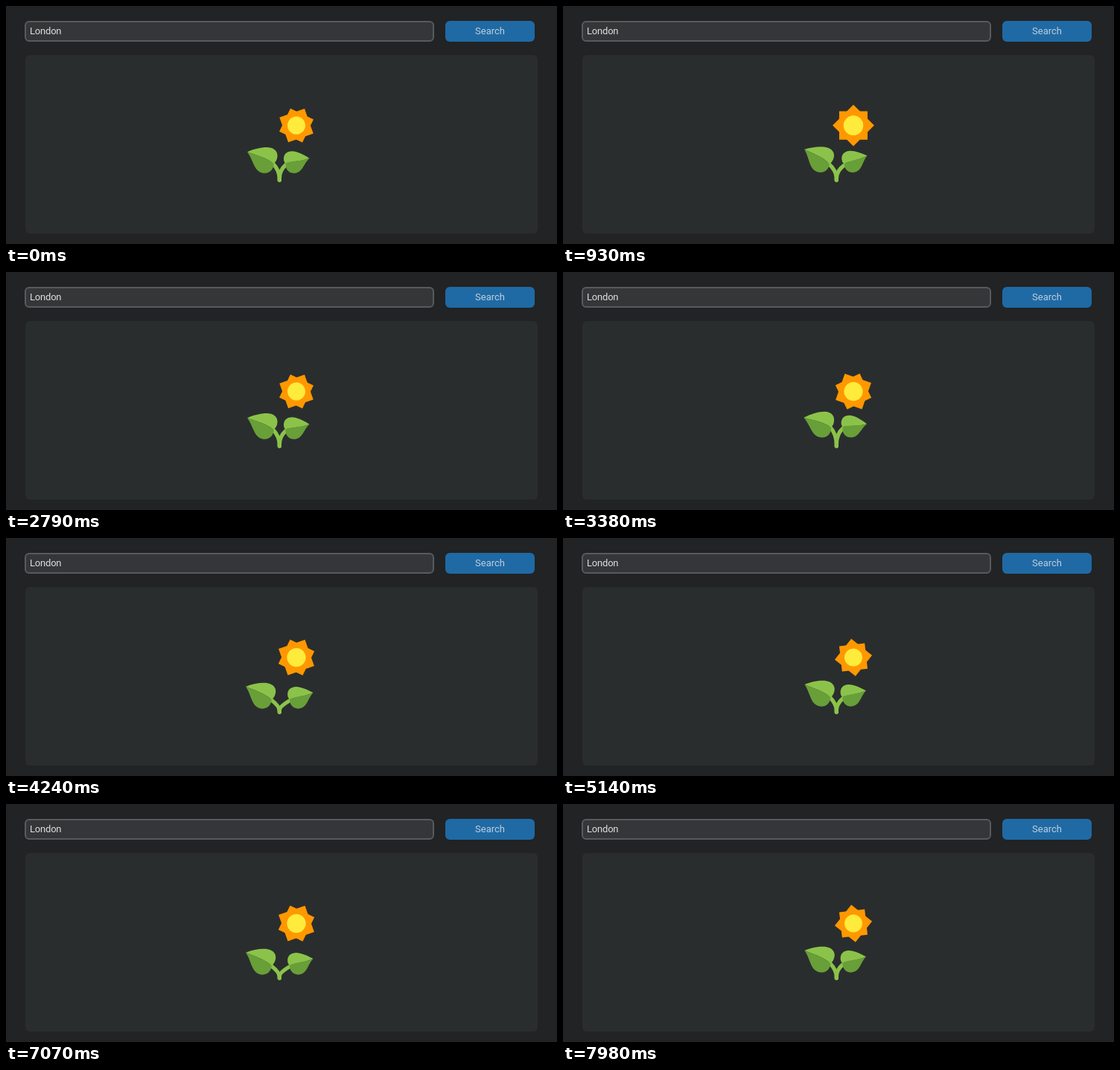
An HTML page that plays this animation: 740 px wide and 320 px high, repeating every 8000 ms.

```html
<!DOCTYPE html>
<html lang="en">
<head>
<meta charset="utf-8">
<title>City search</title>
<style>
  html, body { margin: 0; width: 100%; height: 100%; overflow: hidden; background: #212325; }
  svg { display: block; width: 740px; height: 320px; }
  text { font: 13px Roboto, sans-serif; }
  .entry { fill: #dedede; letter-spacing: -.2px; }
  .light { fill: #8bc34a; }
  .dark { fill: #689f38; }
  .stem { fill: none; stroke: #8bc34a; stroke-width: 5.3; stroke-linecap: round; }
</style>
</head>
<body>
<svg viewBox="0 0 740 320">
  <rect x="26" y="21" width="548" height="26" rx="5" fill="#343638" stroke="#565b5e" stroke-width="2"/>
  <text class="entry" x="32" y="38">London</text>
  <rect x="590" y="20" width="120" height="28" rx="6" fill="#1f6aa5"/>
  <text x="650" y="38" text-anchor="middle" fill="#c0cedb">Search</text>
  <rect x="26" y="66" width="688" height="240" rx="6" fill="#2a2d2e"/>

  <g id="sun">
    <g fill="#ff9800">
      <path d="M0-1 1 0 0 1-1 0Z"/>
      <path d="M0-1 1 0 0 1-1 0Z" transform="rotate(45) scale(.965)"/>
    </g>
    <circle r=".475" fill="#ffeb3b"/>
  </g>

  <path id="leftStem" class="stem"/>
  <path id="rightStem" class="stem"/>
  <g id="leftLeaf">
    <path class="light" d="M0 0C10-4.5 22-7 29-6C38-5 41 1 40.5 6C40 11 38 14 35.5 15.5C25 7 13 5 0 0Z"/>
    <path class="dark" d="M0 0C13 5 25 7 35.5 15.5C36 22 31 28.5 24 28.5C9 28.5 9 12 0 0Z"/>
  </g>
  <g id="rightLeaf">
    <path class="light" d="M0 0C-8-5-17-9.5-23-9.5C-31-9.5-34.5-5-34.5 1C-34.5 4-33.5 5.5-32 6.5C-22 4-10 4 0 0Z"/>
    <path class="dark" d="M0 0C-10 4-22 3-32 6.5C-33 14-28 20-21 20C-9 20-8 7 0 0Z"/>
  </g>
</svg>
<script>
const LOOP = 8000;
const STEP = 101.6;
const LEAD = 86.2; // time already spent in the first step
const CYCLE = 28;  // steps in one sway of the plant

// tip: resting place; pivot and base: points relative to the tip.
const leaves = {
  left: { tip: [324, 196.3], pivot: [12, 10], base: [35, 16], spread: -2.5, lean: 1 },
  right: { tip: [407.5, 204.7], pivot: [-10, 8], base: [-31, 8], spread: 5.6, lean: -1.2 }
};

const byId = id => document.getElementById(id);
const ease = u => (1 - Math.cos(Math.PI * u)) / 2;

// Smooth bump around a step, repeating every cycle.
function pulse(phase, center, reach) {
  const away = Math.abs(phase - center);
  const distance = Math.min(away, CYCLE - away);
  return distance < reach ? ease(1 - distance / reach) : 0;
}

// The leaves rise slowly for 24 steps, then drop back in 4.
function heightAt(phase) {
  const since = (phase + 14) % CYCLE;
  const raised = since < 24 ? (since / 24) ** .8 : 1 - ease((since - 24) / 4);
  return 6.2 * raised - 4;
}

function tiltAt(phase) {
  return 2.5 - 7.5 * pulse(phase, 5, 8) + 6 * pulse(phase, 10, 5);
}

function drawLeaf(side, phase) {
  const { tip, pivot, base, spread, lean } = leaves[side];
  const x = tip[0] + spread * pulse(phase, 14, 7);
  const y = tip[1] - heightAt(phase);
  const angle = lean * tiltAt(phase);
  byId(side + 'Leaf').setAttribute('transform', `translate(${x} ${y}) rotate(${angle} ${pivot})`);

  const a = angle * Math.PI / 180;
  const dx = base[0] - pivot[0];
  const dy = base[1] - pivot[1];
  const bx = x + pivot[0] + dx * Math.cos(a) - dy * Math.sin(a);
  const by = y + pivot[1] + dx * Math.sin(a) + dy * Math.cos(a);
  byId(side + 'Stem').setAttribute('d', `M367.3 234V232Q367 ${by + 8.5} ${bx} ${by}`);
}

function drawSun(phase) {
  const radius = 25.2 + 2.7 * pulse(phase, 10, 8);
  const angle = (phase - 10) * 180 / CYCLE;
  byId('sun').setAttribute('transform', `translate(390 160.6) rotate(${angle}) scale(${radius})`);
}

function draw() {
  const time = performance.now() % LOOP;
  const phase = Math.floor((time + LEAD) / STEP) % CYCLE;
  drawSun(phase);
  drawLeaf('left', phase);
  drawLeaf('right', phase);
  requestAnimationFrame(draw);
}
draw();
</script>
</body>
</html>
```
